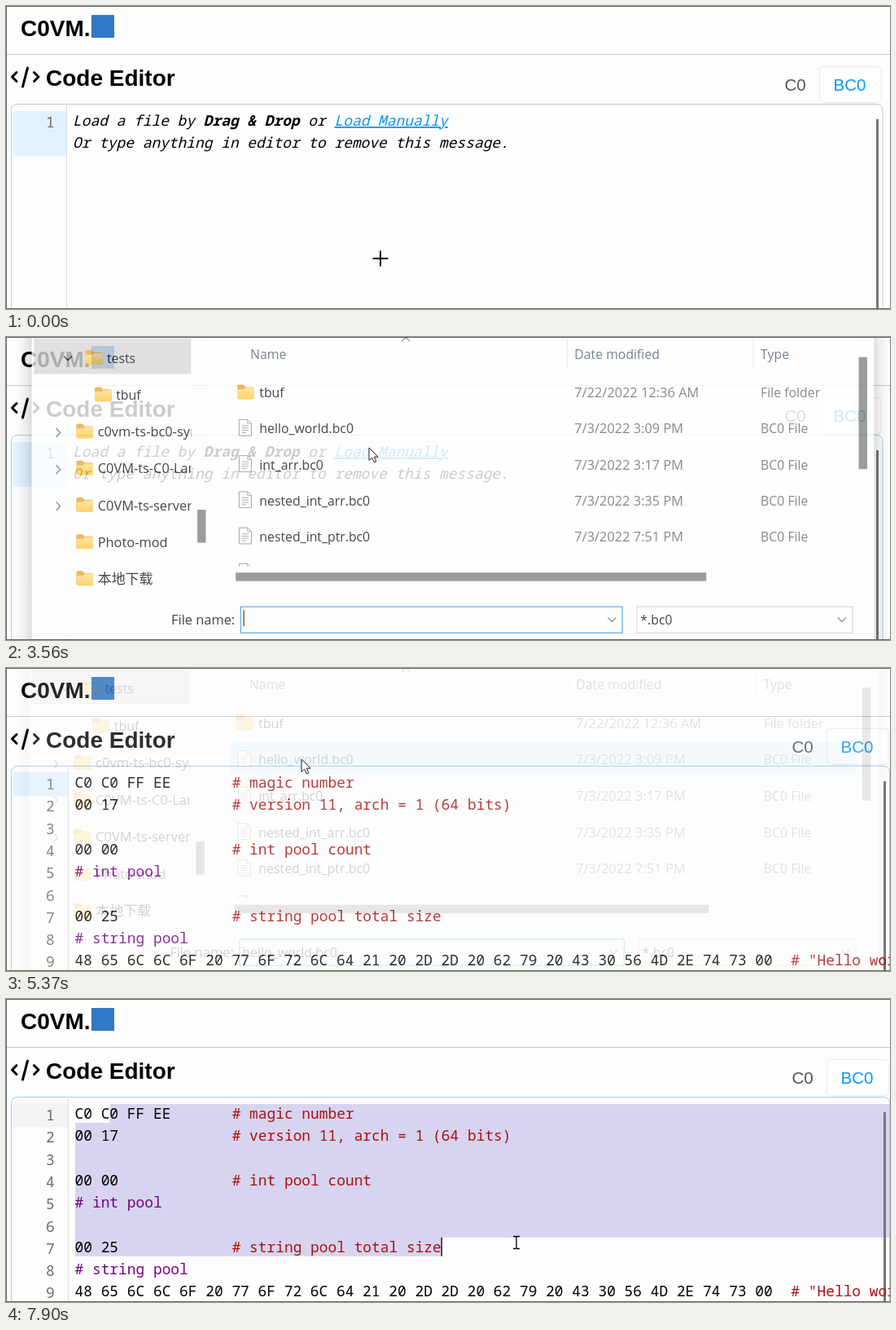
An HTML page for the animation above (7990 ms loop, 1086 px wide and 372 px high).

```html
<!DOCTYPE html>
<html lang="en">
<head>
<meta charset="utf-8">
<title>C0VM code editor</title>
<style>
html, body { margin: 0; width: 100%; height: 100%; overflow: hidden; background: #fdfdfd; }
svg { display: block; width: 100vw; height: 100vh; }
text { white-space: pre; }
.head { font: bold 28px "Liberation Sans", Arial, sans-serif; }
.tab { font: 20.6px "Liberation Sans", Arial, sans-serif; }
.code { font: 17.88px "Noto Sans Mono", monospace; }
.hint { font-style: italic; }
.link { fill: #0c97e8; text-decoration: underline 1.3px; text-underline-offset: 3px; }
.ui { font: 16.8px "Open Sans", "Noto Sans", sans-serif; fill: #1a1a1a; }
.wide { font-size: 17.4px; }
.cjk { font: 18px "Noto Sans CJK SC", "Noto Sans CJK", sans-serif; }
.dim { fill: #6d6d6d; }
.line { fill: none; stroke-linecap: round; stroke-linejoin: round; }
</style>
</head>
<body>
<svg id="stage" viewBox="0 0 1086 372" preserveAspectRatio="none"></svg>
<script>
const LOOP = 7990;
const COL = 10.73, ROW = 27.3, LEFT = 84.5, TOP = 129;

const rows = [
  ["C0 C0 FF EE", "# magic number"],
  ["00 17", "# version 11, arch = 1 (64 bits)"],
  [""],
  ["00 00", "# int pool count"],
  ["# int pool"],
  [""],
  ["00 25", "# string pool total size"],
  ["# string pool"],
  ["48 65 6C 6C 6F 20 77 6F 72 6C 64 21 20 2D 2D 20 62 79 20 43 30 56 4D 2E 74 73 00",
   '# "Hello world! -- by C0VM.ts"']
];
const noteCol = code => Math.max(18, code.length + 2);
const rowLength = ([code, note]) => note ? noteCol(code) + note.length : code.length;

const rect = (x, y, w, h, fill, more = "") =>
  `<rect x="${x}" y="${y}" width="${w}" height="${h}" fill="${fill}" ${more}/>`;
const text = (x, y, s, cls, more = "") =>
  `<text x="${x}" y="${y}" class="${cls}" ${more}>${s}</text>`;
const line = (d, color, w = 1.3) =>
  `<path class="line" d="${d}" stroke="${color}" stroke-width="${w}"/>`;

const folder = (x, y) => `<g transform="translate(${x} ${y - 10})">
  <path d="M0 2q0-2 2-2h6l3 3h9q2 0 2 2v12H0z" fill="#e9a93a"/>
  <path d="M0 7q0-1 1-1h8l2-2h10q1 0 1 1v12q0 2-2 2H2q-2 0-2-2z" fill="url(#gold)"/></g>`;
const sheet = (x, y) => `<g transform="translate(${x} ${y - 12})">
  <path d="M.5.5h11l5 5v16h-16z" fill="#fff" stroke="#8c8c8c"/>
  <path d="M11.5.5v5h5M4 8.5h9M4 11.5h9M4 14.5h9M4 17.5h6" fill="none" stroke="#9a9a9a"/></g>`;

function editorBox(right, gutter, barX) {
  return `<path d="M6.5 372V128.5q0-8 8-8H${right - 8}q8 0 8 8V372" fill="none" stroke="#c8c8c8" class="edge"/>
    <path d="M${gutter} 122V372" stroke="#dcdcdc"/>` +
    rect(barX, 139, 3, 233, "#777");
}

function tabs(dx) {
  return `<g transform="translate(${dx} 0)">` +
    rect(999.5, 75.5, 76, 44, "#000", 'rx="5" opacity=".04"') +
    rect(999.5, 74.5, 75.5, 44, "#fff", 'rx="4" stroke="#e9e9e9"') +
    text(956.5, 104, "C0", "tab", 'fill="#585454"') +
    text(1016.5, 104, "BC0", "tab", 'fill="#0c97fb"') + "</g>";
}

const header =
  text(18, 36.5, "C0VM.", "head") + rect(105, 11, 28, 28, "#3178c6") +
  rect(0, 59, 1086, 1, "#c9c9c9") +
  line("M13 81.5L7.5 87L13 92.5M34.5 81.5L40 87L34.5 92.5M26.5 76L20.5 99", "#000", 3) +
  text(49, 98, "Code Editor", "head");

const emptyPage = rect(9, 129, 65, 55, "#e2f1ff") + editorBox(1077, 74.5, 1069) + tabs(0) +
  text(49, 149, "1", "code", 'fill="#6c6c6c"') +
  text(82, 147, 'Load a file by <tspan font-weight="bold">Drag &amp; Drop</tspan> or ' +
    '<tspan class="link">Load Manually</tspan>', "code hint") +
  text(82, 147 + ROW, "Or type anything in editor to remove this message.", "code hint");

const loadedPage = rect(9, 128, 67, 29.5, "#e2f1ff", 'id="active"') +
  `<path id="sel" fill="#d7d4f0"/>` + editorBox(1085.5, 76.5, 1078) + tabs(9) +
  rows.map(([code, note], i) => {
    const y = 147 + ROW * i;
    const fill = code[0] === "#" ? "#770088" : "#000";
    return text(49, y + 2, i + 1, "code", 'fill="#6c6c6c"') +
      text(LEFT, y, code, "code", `fill="${fill}"`) +
      (note ? text(LEFT + COL * noteCol(code), y, note, "code", 'fill="#aa1111"') : "");
  }).join("") + rect(0, 0, 1.3, 23, "#000", 'id="caret"');

const folders = ["c0vm-ts-bc0-syntax", "C0VM-ts-C0-Language", "C0VM-ts-server", "Photo-mod", "本地下载"];
const nav = rect(8, -4, 205, 46, "#d9d9d9") + line("M47 19l5 5 5-5", "#444", 1.6) +
  folder(75, 21) + text(103, 27.5, "tests", "ui") +
  folder(87, 69) + text(115, 75.5, "tbuf", "ui") +
  folders.map((name, i) => {
    const y = 117 + 48 * i;
    return (i < 3 ? line(`M37 ${y - 4}l5 5.5-5 5.5`, "#777", 1.5) : "") + folder(63, y) +
      text(91, y + 6.5, name, i === 4 ? "ui cjk" : "ui wide");
  }).join("");

const files = [
  ["tbuf", "7/22/2022 12:36 AM"], ["hello_world.bc0", "7/3/2022 3:09 PM"],
  ["int_arr.bc0", "7/3/2022 3:17 PM"], ["nested_int_arr.bc0", "7/3/2022 3:35 PM"],
  ["nested_int_ptr.bc0", "7/3/2022 7:51 PM"]
];
const list = rect(266, 0, 810, 42, "#e5f1fb", 'id="hover"') +
  line("M488 -1l5-5 5 5", "#777") +
  [["Name", 290], ["Date modified", 713], ["Type", 956]].map(([s, x]) =>
    text(x, 22, s, "ui", 'style="fill:#53647c"')).join("") +
  rect(703, -20, 1, 55, "#e2e2e2") + rect(946, -20, 1, 55, "#e2e2e2") +
  files.map(([name, date], i) => {
    const y = 66 + 47 * i;
    return (i ? sheet(275, y) : folder(273, y)) + text(302, y + 6.5, name, "ui") +
      text(713, y + 6.5, date, "ui wide dim") + text(956, y + 6.5, i ? "BC0 File" : "File folder", "ui dim");
  }).join("") + sheet(275, 301);

const dialog = rect(4, -200, 1100, 700, "#000", 'opacity=".3" filter="url(#blur)"') +
  rect(5, -200, 1099, 700, "#f0f0f0", 'id="panel"') +
  rect(5, -200, 208, 519, "#fff") + rect(240, -200, 836, 494, "#fff") +
  `<g clip-path="url(#navClip)">${nav}</g><g clip-path="url(#listClip)">${list}</g>` +
  rect(221, 219, 11, 43, "#858585") + rect(271, 301, 614, 11, "#858585") + rect(1084, 20, 11, 146, "#858585") +
  text(270, 368.5, "File name:", "ui wide", 'text-anchor="end"') +
  rect(277.5, 345.5, 498, 34, "#fff", 'stroke="#0078d4"') +
  rect(794.5, 345.5, 281.5, 34, "#fff", 'stroke="#c4c4c4"') +
  line("M757 360l5 5 5-5M1057 360l5 5 5-5", "#777") +
  text(799, 368.5, "*.bc0", "ui") + text(281, 368.5, "hello_world.bc0", "ui", 'id="picked"') +
  rect(281, 350, 1.2, 21, "#000", 'id="blink"');

const pointers = {
  cross: `<path d="M-9.5 0h19M0 -9.5v19" stroke="#000" stroke-width="2"/>`,
  hand: `<path d="M-2 1q0-2 2-2t2 2v7l6 1.500q3 1 2.500 4l-1 6.500h-9l-6-8q1.500-2 3.500 0z" fill="#fff" stroke="#000" stroke-linejoin="round"/>`,
  arrow: `<path d="M0 0v15.500l3.600-3.400 2.700 5.800 2.500-1.100-2.600-5.600h4.800z" fill="#fff" stroke="#222"/>`,
  beam: `<path d="M-4 -7.500h3l1 1 1-1h3M0 -6.500v13M-4 7.500h3l1-1 1 1h3" fill="none" stroke="#000" stroke-width="1.3"/>`
};

document.getElementById("stage").innerHTML = `<defs>
  <linearGradient id="gold" x2="0" y2="1"><stop stop-color="#ffe08a"/><stop offset="1" stop-color="#ffc845"/></linearGradient>
  <filter id="blur" x="-5%" y="-5%" width="110%" height="110%"><feGaussianBlur stdDeviation="12"/></filter>
  <clipPath id="navClip"><rect y="-50" width="213" height="369"/></clipPath>
  <clipPath id="listClip"><rect x="245" y="-50" width="831" height="343"/></clipPath></defs>` +
  rect(0, 0, 1086, 372, "#fdfdfd") + header +
  `<g id="empty">${emptyPage}</g><g id="loaded">${loadedPage}</g><g id="dialog">${dialog}</g><g id="pointer">` +
  Object.entries(pointers).map(([k, v]) => `<g id="${k}">${v}</g>`).join("") + "</g>" +
  rect(0, 0, 1086, 1, "#666") + rect(0, 0, 1, 372, "#666") + rect(0, 371, 1086, 1, "#666");

const $ = id => document.getElementById(id);
const set = (id, attrs) => { for (const k in attrs) $(id).setAttribute(k, attrs[k]); };
const show = (id, on) => set(id, { visibility: on ? "visible" : "hidden" });
const edges = document.querySelectorAll(".edge");

// Pointer moves: first step, last step, step count, end point, optional bend and easing
const ease = p => p < .5 ? 4 * p ** 3 : 1 - (2 - 2 * p) ** 3 / 2;
const moves = [
  { a: 90, b: 170, n: 2, to: [407, 310] },
  { a: 1840, b: 2560, n: 9, to: [447, 143], soft: true },
  { a: 2650, b: 2830, n: 3, to: [446, 136] },
  { a: 4300, b: 4840, n: 7, to: [360, 101], bend: [400, 50] },
  { a: 4930, b: 5020, n: 2, to: [363, 112] },
  { a: 6380, b: 7100, n: 9, to: [138, 140], bend: [280, 230] },
  { a: 7180, b: 7180, n: 1, to: [135, 140] },
  { a: 7360, b: 7450, n: 2, to: [243, 152] },
  { a: 7540, b: 7900, n: 5, to: [627, 299] }
];

function pointerAt(t) {
  let from = [460, 310];
  for (const { a, b, n, to, bend, soft } of moves) {
    if (t < a) break;
    const k = t >= b ? n : Math.floor((t - a) / (b - a) * (n - 1) + 1e-6) + 1;
    const p = soft ? ease(k / n) : k / n;
    if (k === n) { from = to; continue; }
    return from.map((v, i) => {
      const c = bend ? bend[i] : (v + to[i]) / 2;
      return (1 - p) ** 2 * v + 2 * p * (1 - p) * c + p * p * to[i];
    });
  }
  return from;
}

// Opacity and scale of the file dialog
function dialogAt(t) {
  const stages = [[3560, .8, .9415], [3650, .97, .985], [3740, 1, 1],
    [5200, .9, .99], [5280, .55, .97], [5370, .18, .9485], [5460, 0, .94]];
  return stages.filter(s => t >= s[0]).pop() || [0, 0, 1];
}

function drawSelection(t, x, y) {
  const dragging = t >= 7360;
  let cx = LEFT - .5, row = 0;
  if (dragging) {
    row = Math.max(0, Math.floor((y - 127) / ROW));
    const col = Math.min(Math.round((x - LEFT) / COL), rowLength(rows[row]));
    cx = LEFT + COL * col;
  }
  const top = TOP + ROW * row, start = LEFT + COL * 4;
  let d = "";
  if (dragging) {
    d = row === 0 ? `M${start} ${TOP}H${cx}v23H${start}z`
      : `M${start} ${TOP}H1086V${top}H${cx}v23H85V152H${start}z`;
  }
  set("sel", { d });
  set("caret", { x: cx - .6, y: top });
  show("caret", dragging || (t >= 5640 && t < 6200) || t >= 6760);
  set("active", { fill: dragging ? "#f3f3f3" : "#e2f1ff" });
}

function draw(t) {
  const [x, y] = pointerAt(t);
  const loaded = t >= 5280;
  $("empty").style.display = loaded ? "none" : "";
  $("loaded").style.display = loaded ? "" : "none";
  const border = t < 3290 ? "#c8c8c8" : t < 3380 ? "#b4cfe2" : "#9fcdf2";
  edges.forEach(e => e.setAttribute("stroke", border));

  const [, alpha, s] = dialogAt(t);
  $("dialog").style.display = alpha ? "" : "none";
  set("dialog", { opacity: alpha, transform: `translate(${462 * (1 - s)} ${100 * (1 - s)}) scale(${s})` });
  set("panel", { fill: s < 1 ? "#fdfdfd" : "#f0f0f0" });
  const chosen = t >= 5110;
  const over = chosen ? 1 : Math.floor((y - 44) / 47);
  const inRow = chosen || (t >= 4300 && over >= 0 && y - 44 - over * 47 < 42);
  set("hover", { y: 44 + 47 * over, fill: chosen ? "#cce8ff" : "#e5f1fb", opacity: inRow ? 1 : 0 });
  set("picked", { opacity: chosen ? 1 : 0 });
  set("blink", { opacity: !chosen && (t < 4020 || t >= 4560) ? 1 : 0 });

  drawSelection(t, x, y);

  const kind = t >= 5460 && y > 121 ? "beam" : t >= 3560 ? "arrow" : y < 152 ? "hand" : "cross";
  for (const k in pointers) show(k, k === kind);
  set("pointer", { transform: `translate(${x} ${y})` });
}

const began = performance.now();
function tick() {
  draw((performance.now() - began) % LOOP);
  requestAnimationFrame(tick);
}
tick();
</script>
</body>
</html>
```
